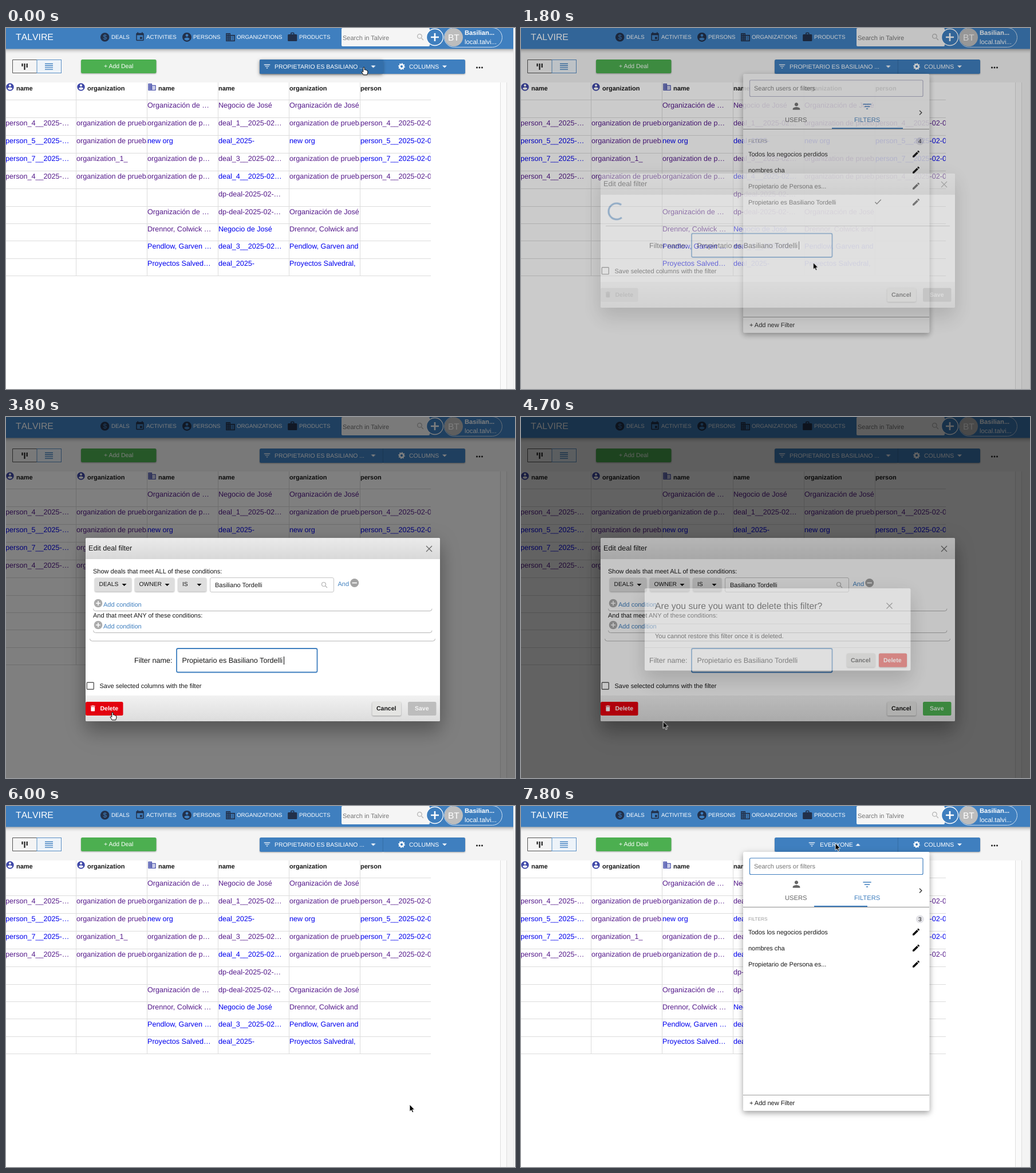
Animation of 889x630 px, one loop 8000 ms. Source, as an HTML page:

```html
<!DOCTYPE html>
<html lang="en">
<head>
<meta charset="utf-8">
<title>Deal filters</title>
<style>
html, body { margin: 0; width: 100%; height: 100%; overflow: hidden; background: #f5f5f5; }
#stage { display: block; width: 889px; height: 630px; }
text { font: 11px "Liberation Sans", Arial, sans-serif; fill: #161616; text-rendering: geometricPrecision; white-space: pre; }
.nav { font-size: 9.7px; fill: #fff; }
.btn { font-size: 10.45px; fill: #fff; }
.pick { font-size: 10.3px; }
.bold { font-weight: 700; font-size: 10.5px; }
.mid { font-size: 12.6px; }
.white { fill: #fff; }
.blue { fill: #3f7fbf; }
.grey { fill: #757575; }
.dark { fill: #22304a; }
.cell { font-size: 12.6px; fill: #551a8b; }
.cell.new { fill: #0000ee; }
.rule { stroke: #dcdcdc; }
.raise { filter: drop-shadow(0 1.5px 1.2px rgba(0,0,0,.32)); }
.pop-paper { filter: drop-shadow(0 4px 5px rgba(0,0,0,.24)) drop-shadow(0 2px 6px rgba(0,0,0,.16)); }
.paper { filter: drop-shadow(0 20px 16px rgba(0,0,0,.2)) drop-shadow(0 6px 16px rgba(0,0,0,.18)); }

/* 1% = 80 ms */
.step, .fade, #cursor { animation: 8s linear infinite both; }
.step { animation-timing-function: step-end; }

#cursor { animation-name: move; }
@keyframes move {
  0%, 3.5% { transform: translate(625px,68px) }
  6.25% { transform: translate(664px,140px) }
  8.75% { transform: translate(687px,205px) }
  11.25% { transform: translate(688px,213px) }
  12.5% { transform: translate(689px,243px) }
  15%, 18% { transform: translate(689px,300px) }
  20% { transform: translate(640px,345px) }
  22.5% { transform: translate(511px,409px) }
  25% { transform: translate(385px,464px) }
  27.5% { transform: translate(265px,498px) }
  31.25% { transform: translate(190px,515px) }
  35%, 53% { transform: translate(186px,515px) }
  56.25% { transform: translate(196px,524px) }
  60% { transform: translate(274px,535px) }
  62.5% { transform: translate(410px,525px) }
  63.75% { transform: translate(530px,492px) }
  65% { transform: translate(635px,438px) }
  66.25%, 69% { transform: translate(653px,421px) }
  72.5% { transform: translate(690px,496px) }
  74.5%, 79% { transform: translate(705px,521px) }
  81.25% { transform: translate(728px,558px) }
  84% { transform: translate(684px,400px) }
  87.5% { transform: translate(568px,112px) }
  90%, 100% { transform: translate(549px,65px) }
}
.hand { animation-name: hand; }
@keyframes hand {
  0%, 13.2%, 30%, 65%, 88.75% { visibility: visible }
  3.75%, 19%, 53.5%, 70%, 91.25%, 100% { visibility: hidden }
}
.arrow { animation-name: arrow; }
@keyframes arrow {
  0%, 13.2%, 30%, 65%, 88.75% { visibility: hidden }
  3.75%, 19%, 53.5%, 70%, 91.25%, 100% { visibility: visible }
}
.hover { animation-name: hover; }
@keyframes hover { 0%, 88.75% { visibility: visible } 3.75%, 92.5%, 100% { visibility: hidden } }
.gutter { animation-name: gutter; }
@keyframes gutter { 0%, 73% { visibility: visible } 3.75%, 92.5%, 100% { visibility: hidden } }

.named { animation-name: named; }
@keyframes named { 0% { visibility: visible } 81.25%, 100% { visibility: hidden } }
.everyone { animation-name: everyone; }
@keyframes everyone { 0% { visibility: hidden } 81.25%, 100% { visibility: visible } }
.flip { animation-name: flip; }
@keyframes flip { 0%, 21.25% { transform: none } 3.75%, 92.5%, 100% { transform: scaleY(-1) } }

#pop { animation-name: pop; transform-origin: 550px 80px; }
@keyframes pop {
  0%, 3.75% { opacity: 0; transform: scale(.75,.56) }
  5% { opacity: .6; transform: scale(.92,.86) }
  6.9%, 21.9% { opacity: 1; transform: none }
  22.5% { opacity: .88; transform: none }
  24.5% { opacity: 0; transform: none }
  24.6%, 92.5% { opacity: 0; transform: scale(.75,.56) }
  93.75% { opacity: .6; transform: scale(.92,.86) }
  95.6%, 100% { opacity: 1; transform: none }
}
.focus { animation-name: focus; }
@keyframes focus { 0%, 50%, 100% { stroke: #3f7fbf } 20% { stroke: #adadc6 } }
.tabline { animation-name: tabline; }
@keyframes tabline {
  0%, 17.5% { transform: translateX(512px) scaleX(.75) }
  20%, 50% { transform: translateX(543px) }
  50.1%, 100% { transform: translateX(512px) scaleX(.75) }
}
.row { animation-name: row; }
@keyframes row {
  0% { fill-opacity: 0; transform: none }
  10% { fill-opacity: .05; transform: none }
  12.5% { fill-opacity: .05; transform: translateY(28px) }
  13.75% { fill-opacity: .05; transform: translateY(56px) }
  15% { fill-opacity: .05; transform: translateY(84px) }
  19%, 100% { fill-opacity: 0; transform: none }
}

.edit { animation-name: edit; }
@keyframes edit {
  0%, 21.25% { opacity: 0 } 22.5% { opacity: .4 } 24%, 70.6% { opacity: 1 } 73%, 100% { opacity: 0 }
}
.loading { animation-name: loading; }
@keyframes loading { 0% { visibility: visible } 26.25%, 100% { visibility: hidden } }
.loaded { animation-name: loaded; }
@keyframes loaded { 0% { visibility: hidden } 26.25%, 100% { visibility: visible } }
.down { animation-name: down; }
@keyframes down { 0% { transform: translateY(43px) } 26.25%, 100% { transform: none } }
.up { animation-name: up; }
@keyframes up { 0% { transform: translateY(-45.5px) } 26.25%, 100% { transform: none } }
.foot { animation-name: foot; }
@keyframes foot { 0% { transform: translateY(-43.3px) } 26.25%, 100% { transform: none } }
.trash { animation-name: trash; }
@keyframes trash { 0% { fill: #d2d2d2 } 26.25%, 100% { fill: #e3000f } }
.label { animation-name: label; }
@keyframes label { 0% { fill: #a8a8a8 } 26.25%, 100% { fill: #fff } }
.save { animation-name: save; }
@keyframes save { 0% { fill: #bdbdbd } 48.75%, 100% { fill: #4caf50 } }
.caret { animation-name: caret; }
@keyframes caret {
  0%, 22.5%, 35%, 47.5%, 60% { visibility: visible }
  28.75%, 41.25%, 53.75%, 66.25%, 100% { visibility: hidden }
}
.spin { animation: spin 1.6s linear infinite; transform-origin: 167px 320px; }
@keyframes spin { from { transform: rotate(5deg) } to { transform: rotate(365deg) } }

.ask { animation-name: ask; }
@keyframes ask {
  0%, 57.5% { opacity: 0 } 58.75% { opacity: .45 } 60% { opacity: .95 }
  60.6%, 68.75% { opacity: 1 } 71.2%, 100% { opacity: 0 }
}
.sure { animation-name: sure; }
@keyframes sure { 0% { fill: #e53935 } 65%, 100% { fill: #c62828 } }
</style>
</head>
<body>
<svg id="stage" viewBox="0 0 889 630" xmlns="http://www.w3.org/2000/svg">
<defs>
  <symbol id="account" viewBox="0 0 24 24"><path d="M12 2C6.48 2 2 6.48 2 12s4.48 10 10 10 10-4.48 10-10S17.52 2 12 2zm0 3c1.66 0 3 1.34 3 3s-1.34 3-3 3-3-1.34-3-3 1.34-3 3-3zm0 14.2c-2.5 0-4.71-1.28-6-3.22.03-1.99 4-3.08 6-3.08 1.99 0 5.97 1.09 6 3.08-1.29 1.94-3.5 3.22-6 3.22z"/></symbol>
  <symbol id="event" viewBox="0 0 24 24"><path d="M17 12h-5v5h5v-5zM16 1v2H8V1H6v2H5c-1.1 0-2 .9-2 2v14c0 1.1.9 2 2 2h14c1.1 0 2-.9 2-2V5c0-1.1-.9-2-2-2h-1V1h-2zm3 18H5V8h14v11z"/></symbol>
  <symbol id="business" viewBox="0 0 24 24"><path d="M12 7V3H2v18h20V7H12zM6 19H4v-2h2v2zm0-4H4v-2h2v2zm0-4H4V9h2v2zm0-4H4V5h2v2zm4 12H8v-2h2v2zm0-4H8v-2h2v2zm0-4H8V9h2v2zm0-4H8V5h2v2zm10 12h-8v-2h2v-2h-2v-2h2v-2h-2V9h8v10zm-2-8h-2v2h2v-2zm0 4h-2v2h2v-2z"/></symbol>
  <symbol id="work" viewBox="0 0 24 24"><path d="M20 6h-4V4c0-1.1-.9-2-2-2h-4c-1.1 0-2 .9-2 2v2H4c-1.1 0-2 .9-2 2v11c0 1.1.9 2 2 2h16c1.1 0 2-.9 2-2V8c0-1.1-.9-2-2-2zm-6 0h-4V4h4v2z"/></symbol>
  <symbol id="filter" viewBox="0 0 24 24"><path d="M10 18h4v-2h-4v2zM3 6v2h18V6H3zm3 7h12v-2H6v2z"/></symbol>
  <symbol id="pencil" viewBox="0 0 24 24"><path d="M3 17.25V21h3.75L17.81 9.94l-3.75-3.75L3 17.25zM20.71 7.04c.39-.39.39-1.02 0-1.41l-2.34-2.34c-.39-.39-1.02-.39-1.41 0l-1.83 1.83 3.75 3.75 1.83-1.83z"/></symbol>
  <symbol id="person" viewBox="0 0 24 24"><path d="M12 12c2.21 0 4-1.79 4-4s-1.79-4-4-4-4 1.79-4 4 1.79 4 4 4zm0 2c-2.67 0-8 1.34-8 4v2h16v-2c0-2.66-5.33-4-8-4z"/></symbol>
  <symbol id="bin" viewBox="0 0 24 24"><path d="M6 19c0 1.1.9 2 2 2h8c1.1 0 2-.9 2-2V7H6v12zM19 4h-3.5l-1-1h-5l-1 1H5v2h14V4z"/></symbol>
  <symbol id="search" viewBox="0 0 12 12"><path d="M8 8l3 3M1.5 5a3.5 3.5 0 1 0 7 0a3.5 3.5 0 1 0-7 0" fill="none" stroke="#b4b4b4" stroke-width="1.2"/></symbol>
  <path id="drop" d="M-4-2h8l-4 4z"/>
  <path id="cross" d="M-5-5L5 5M5-5L-5 5" stroke="#666" stroke-width="1.2"/>
  <g id="add">
    <circle cx="161" cy="325" r="7.3" fill="#ababab"/>
    <path d="M157 325h8M161 321v8" stroke="#fff" stroke-width="1.6"/>
    <text class="blue" x="170" y="330.5">Add condition</text>
  </g>
  <linearGradient id="bar" x2="0" y2="1"><stop stop-color="#ebebeb"/><stop offset="1" stop-color="#d8d8d8"/></linearGradient>
  <linearGradient id="base" x2="0" y2="1"><stop stop-color="#f2f2f2"/><stop offset="1" stop-color="#dcdcdc"/></linearGradient>
</defs>

<rect width="889" height="630" fill="#f4f4f4"/>
<path d="M0 95H863V630H0z" fill="#fff"/>
<path d="M863 95H874V630H863z" fill="#fafafa"/>
<path d="M863.5 95V630M874.5 95V630" stroke="#dedede"/>

<rect x="-10" y="-10" width="909" height="46.5" fill="#3f7fbf" style="filter:drop-shadow(0 2px 3px rgba(0,0,0,.35))"/>
<g class="step gutter">
  <rect x="886" width="3" height="630" fill="#fafafa"/>
  <path d="M886.5 0V630" stroke="#e4e4e4"/>
</g>
<text class="white" x="17" y="21.3" style="font-size:15.8px;font-kerning:none">TALVIRE</text>
<g class="dark">
  <circle cx="172.7" cy="16" r="7.8"/>
  <use href="#event" x="225" y="6.5" width="18" height="18"/>
  <use href="#account" x="306.5" y="6.5" width="19" height="19"/>
  <use href="#business" x="382.5" y="6.5" width="19" height="19"/>
  <use href="#work" x="490.5" y="6" width="19.5" height="19.5"/>
</g>
<text class="blue" x="169.5" y="20.2" style="font-size:12px">$</text>
<text class="nav" x="184" y="19">DEALS</text>
<text class="nav" x="245" y="19">ACTIVITIES</text>
<text class="nav" x="327" y="19">PERSONS</text>
<text class="nav" x="403" y="19">ORGANIZATIONS</text>
<text class="nav" x="512" y="19">PRODUCTS</text>
<rect x="586" y="0" width="154" height="32" rx="2" fill="#f5f5f5"/>
<text class="grey" x="588" y="20.5">Search in Talvire</text>
<use href="#search" x="717" y="9" width="13" height="13"/>
<circle cx="749" cy="16" r="14.5" fill="#3f7fbf" stroke="#fff" stroke-width="1.3"/>
<path d="M742 16h14M749 9v14" stroke="#fff" stroke-width="2.6"/>
<rect x="765.5" y="-.5" width="101" height="34" rx="17" fill="none" stroke="#cfe0f1"/>
<circle cx="782" cy="16.3" r="16" fill="#bdbdbd"/>
<text class="white" x="772" y="22" style="font-size:15.5px">BT</text>
<text class="white" x="801" y="12.3" style="font-size:11.2px;font-weight:700">Basilian...</text>
<text class="white" x="801" y="27.8" style="font-size:11.3px">local.talvi...</text>

<path d="M54 55.5H11.5V78.5H54" fill="none" stroke="#555"/>
<rect x="54" y="55.5" width="42.5" height="23" fill="#edf3f9" stroke="#5b8fc4"/>
<path d="M28.5 62v5M32.5 62v11M36.7 62v7" stroke="#222" stroke-width="2.2"/>
<path d="M68 62.5h14M68 65.8h14M68 69.1h14M68 72.4h14" stroke="#3f7fbf" stroke-width="1.4"/>
<rect class="raise" x="131" y="55" width="131.5" height="24" rx="2.5" fill="#4caf50"/>
<text class="btn" x="171" y="70">+ Add Deal</text>
<path class="raise" d="M445.5 55H658V80H445.5q-2.5 0-2.5-2.5V57.5q0-2.5 2.5-2.5z" fill="#3f7fbf"/>
<path class="raise" d="M659 55H799.5q2.5 0 2.5 2.5V77.5q0 2.5-2.5 2.5H659z" fill="#3f7fbf"/>
<rect class="step hover" x="443" y="55" width="215" height="25" rx="2" fill="#336fab" style="filter:drop-shadow(0 2px 3px rgba(0,0,0,.4))"/>
<path d="M658.5 55v25" stroke="#3570aa"/>
<g class="white">
  <g class="step named">
    <use href="#filter" x="449" y="60" width="14" height="14"/>
    <text class="btn" x="469" y="70.5">PROPIETARIO ES BASILIANO ...</text>
    <g transform="translate(641.5 67.5)"><use class="step flip" href="#drop"/></g>
  </g>
  <g class="step everyone">
    <use href="#filter" x="501" y="60" width="14" height="14"/>
    <text class="btn" x="522" y="70.5">EVERYONE</text>
    <g transform="translate(588.5 67.5)"><use class="step flip" href="#drop"/></g>
  </g>
  <text class="btn" x="704" y="70.5">COLUMNS</text>
  <use href="#drop" x="766" y="67.5"/>
</g>
<g fill="none" stroke="#fff" transform="translate(691 67.2)">
  <circle r="3.4" stroke-width="2.6"/>
  <circle r="5" stroke-width="1.8" pathLength="16" stroke-dasharray="1"/>
</g>
<path d="M822.5 69h.01M827 69h.01M831.5 69h.01" stroke="#222" stroke-width="3" stroke-linecap="round"/>

<g id="table"></g>

<g id="pop" class="fade">
  <rect class="pop-paper" x="388" y="80" width="325.5" height="452" rx="2.5" fill="#fff"/>
  <rect class="step focus" x="399.5" y="91" width="302.5" height="28.5" rx="2" fill="#fff" stroke-width="1.2"/>
  <text class="grey" x="407" y="109">Search users or filters</text>
  <use href="#person" x="471.5" y="127" width="19" height="19" fill="#666"/>
  <text x="461" y="164" style="font-size:11.2px;fill:#666">USERS</text>
  <use class="blue" href="#filter" x="595" y="127.5" width="19" height="19"/>
  <text class="blue" x="582" y="164" style="font-size:11.2px">FILTERS</text>
  <path d="M696 144l3.8 3.8l-3.8 3.8" fill="none" stroke="#333" stroke-width="1.4"/>
  <path d="M388 176.5h325" stroke="#8c8c8c"/>
  <rect class="fade tabline blue" y="174" width="124" height="2"/>
  <text x="397" y="200.3" style="font-size:8.3px;fill:#9a9a9a">FILTERS</text>
  <circle cx="696.8" cy="197.5" r="7" fill="#e3e3e8"/>
  <text class="step named" x="694" y="201.2" style="font-size:10px">4</text>
  <text class="step everyone" x="694" y="201.2" style="font-size:10px">3</text>
  <rect class="step row" x="388" y="206" width="325" height="28"/>
  <g id="items"></g>
  <path d="M388 504.5h325" stroke="#9c9c9c"/>
  <text x="399" y="522">+ Add new Filter</text>
</g>

<rect class="fade edit" width="889" height="630" fill-opacity=".5"/>
<g class="fade edit">
  <rect class="paper step loading" x="139" y="254" width="619" height="234" rx="2.5" fill="#fff"/>
  <rect class="paper step loaded" x="139" y="211" width="619" height="320" rx="2.5" fill="#fff"/>
  <g class="step down">
    <path d="M139 248V213.5q0-2.5 2.5-2.5H755.5q2.5 0 2.5 2.5V248z" fill="url(#bar)"/>
    <text class="mid" x="144" y="233">Edit deal filter</text>
    <use href="#cross" x="739" y="230"/>
  </g>
  <g class="step loading">
    <circle class="spin" cx="167" cy="320" r="14" fill="none" stroke="#3f7fbf" stroke-width="3" pathLength="360" stroke-dasharray="255 105"/>
    <path d="M148 345.5h601" stroke="#b5b5b5"/>
  </g>
  <g class="step loaded">
    <g fill="none" stroke="#b4b4b4">
      <path d="M146.5 387q0 4 4 4H745.5q4 0 4-4"/>
      <path d="M152.5 334.500q0 4 4 4H740q4 0 4-4"/>
      <path d="M152.5 372.500q0 4 4 4H740q4 0 4-4"/>
    </g>
    <text x="152" y="272.5">Show deals that meet ALL of these conditions:</text>
    <g class="raise" fill="#dedede">
      <rect x="155" y="280.5" width="64" height="24" rx="2.5"/>
      <rect x="225" y="280.5" width="69" height="24" rx="2.5"/>
      <rect x="300.5" y="280.5" width="49.5" height="24" rx="2.5"/>
    </g>
    <text class="pick" x="162.5" y="295">DEALS</text>
    <text class="pick" x="232.5" y="295">OWNER</text>
    <text class="pick" x="308" y="295">IS</text>
    <use href="#drop" x="206.5" y="293"/>
    <use href="#drop" x="281.5" y="293"/>
    <use href="#drop" x="337.5" y="293"/>
    <rect x="356.5" y="280.5" width="216" height="25" rx="2.5" fill="#fff" stroke="#c4c4c4"/>
    <text x="365" y="296.6">Basiliano Tordelli</text>
    <use href="#search" x="550" y="287" width="12" height="12"/>
    <text class="blue" x="579.5" y="295">And</text>
    <circle cx="608.7" cy="289.5" r="7.5" fill="#a3a3a3"/>
    <path d="M604.5 289.5h8.4" stroke="#fff" stroke-width="1.7"/>
    <use href="#add"/>
    <text x="152" y="350">And that meet ANY of these conditions:</text>
    <use href="#add" y="38"/>
  </g>
  <g class="step up">
    <text class="mid" x="224" y="429">Filter name:</text>
    <rect x="298" y="404" width="245.5" height="41.5" rx="2.5" fill="#fff" stroke="#3f7fbf" stroke-width="1.8"/>
    <text class="mid" x="307.5" y="429">Propietario es Basiliano Tordelli</text>
    <path class="step caret" d="M485.5 418v14" stroke="#000"/>
    <rect x="141.3" y="463.2" width="12" height="12" rx="1" fill="#fff" stroke="#5c5c5c" stroke-width="1.4"/>
    <text x="163.5" y="473">Save selected columns with the filter</text>
  </g>
  <g class="step foot">
    <path d="M139 486H758V528.5q0 2.5-2.5 2.5H141.5q-2.5 0-2.5-2.5z" fill="url(#base)"/>
    <rect class="step trash" x="139" y="497" width="65.5" height="24" rx="2.5"/>
    <use class="step label" href="#bin" x="145" y="501.7" width="13.5" height="13.5"/>
    <text class="bold step label" x="164.5" y="512.2">Delete</text>
    <rect class="raise" x="639.5" y="497" width="50.5" height="24" rx="2.5" fill="#e4e4e2"/>
    <text class="bold" x="647" y="512.2">Cancel</text>
    <rect class="step save" x="702" y="497" width="49.5" height="24" rx="2.5"/>
    <text class="bold white" x="714" y="512.2" fill-opacity=".85">Save</text>
  </g>
</g>

<rect class="fade ask" width="889" height="630" fill-opacity=".5"/>
<g class="fade ask">
  <rect class="paper" x="216" y="299" width="464.5" height="143.5" rx="2.5" fill="#fff"/>
  <text x="234" y="334.5" style="font-size:15.7px">Are you sure you want to delete this filter?</text>
  <use href="#cross" x="643.5" y="329.5"/>
  <path d="M216 361h464.5M216 402.5h464.5" stroke="#dedede"/>
  <text x="234" y="385.5">You cannot restore this filter once it is deleted.</text>
  <rect class="raise" x="569" y="412.5" width="49.5" height="24" rx="2.5" fill="#e0e0de"/>
  <text class="bold" x="576" y="427.5">Cancel</text>
  <rect class="step sure raise" x="625" y="412.5" width="49" height="24" rx="2.5"/>
  <text class="bold white" x="633" y="427.5">Delete</text>
</g>

<g id="cursor" stroke-linejoin="round">
  <path class="step arrow" d="M0 0V12.2L2.8 9.7L4.7 14L6.8 13.1L4.9 8.9H8.6z" fill="#000" stroke="#fff" stroke-width=".9"/>
  <path class="step hand" d="M-1.2 8.5V1.2Q0-.8 1.2 1.2V5Q2.6 4.2 3.3 5.5Q4.8 5 5.2 6.2Q7 6 6.9 8V10Q6 12 5.6 13.8H-.8Q-1.8 11.5-4 8.8Q-3.5 6.6-1.2 8.5z" fill="#fff" stroke="#000"/>
</g>
</svg>

<script>
const $ = id => document.getElementById(id);
const left = c => 124 * c - 1;
const rowTop = r => 125.5 + 31 * r - 0.8 * Math.max(0, r - 6);

// "*" marks a link not yet visited
const org = "organization de prueba", cut = "organization de p…";
const own = "Organización de José", ownCut = "Organización de …";
const rows = [
  ["", "", ownCut, "Negocio de José", own, ""],
  ["person_4__2025-…", org, cut, "deal_1__2025-02…", org, "person_4__2025-02-05"],
  ["*person_5__2025-…", org, "*new org", "*deal_2025-", "*new org", "*person_5__2025-02-05"],
  ["*person_7__2025-…", "organization_1_", cut, "deal_3__2025-02…", org, "*person_7__2025-02-05"],
  ["person_4__2025-…", org, cut, "*deal_4__2025-02…", org, "person_4__2025-02-05"],
  ["", "", "", "dp-deal-2025-02-…", "", ""],
  ["", "", ownCut, "dp-deal-2025-02-…", own, ""],
  ["", "", "Drennor, Colwick …", "*Negocio de José", "Drennor, Colwick and", ""],
  ["", "", "*Pendlow, Garven …", "*deal_3__2025-02…", "*Pendlow, Garven and T", ""],
  ["", "", "*Proyectos Salved…", "*deal_2025-", "*Proyectos Salvedral,", ""]
];
const heads = [["name", "account"], ["organization", "account"], ["name", "business"], ["name"], ["organization"], ["person"]];

let out = "";
heads.forEach(([label, icon], c) => {
  const x = left(c);
  if (icon) out += `<use href="#${icon}" x="${x}" y="95" width="16" height="16" fill="#3f48a8"/>`;
  out += `<text x="${x + (icon ? 19 : 0)}" y="108.5" style="font-weight:700">${label}</text>`;
  if (c) out += `<path class="rule" d="M${x - 0.5} 95V432"/>`;
});
rows.forEach((row, r) => row.forEach((s, c) => {
  if (!s) return;
  const fresh = s[0] === "*";
  out += `<svg x="${left(c)}" y="${rowTop(r)}" width="122.6" height="30"><text class="cell${fresh ? " new" : ""}" y="13.3">${fresh ? s.slice(1) : s}</text></svg>`;
}));
for (let r = 0; r <= rows.length; r++) out += `<path class="rule" d="M0 ${Math.floor(rowTop(r)) + 0.5}H742"/>`;
$("table").innerHTML = out;

const filters = ["Todos los negocios perdidos", "nombres cha", "Propietario de Persona es...", "Propietario es Basiliano Tordelli"];
$("items").innerHTML = filters.map((s, i) => {
  const y = 219.8 + 28 * i, last = i === 3;
  return `<g${last ? ' class="step named"' : ""}><text x="397" y="${y + 3.8}">${s}</text>
    <use href="#pencil" x="682" y="${y - 8}" width="16" height="16"/>
    ${last ? `<path d="M618.5 ${y}l3 3.2l7.2-7.5" fill="none" stroke="#222" stroke-width="1.4"/>` : ""}</g>`;
}).join("");
</script>
</body>
</html>
```
